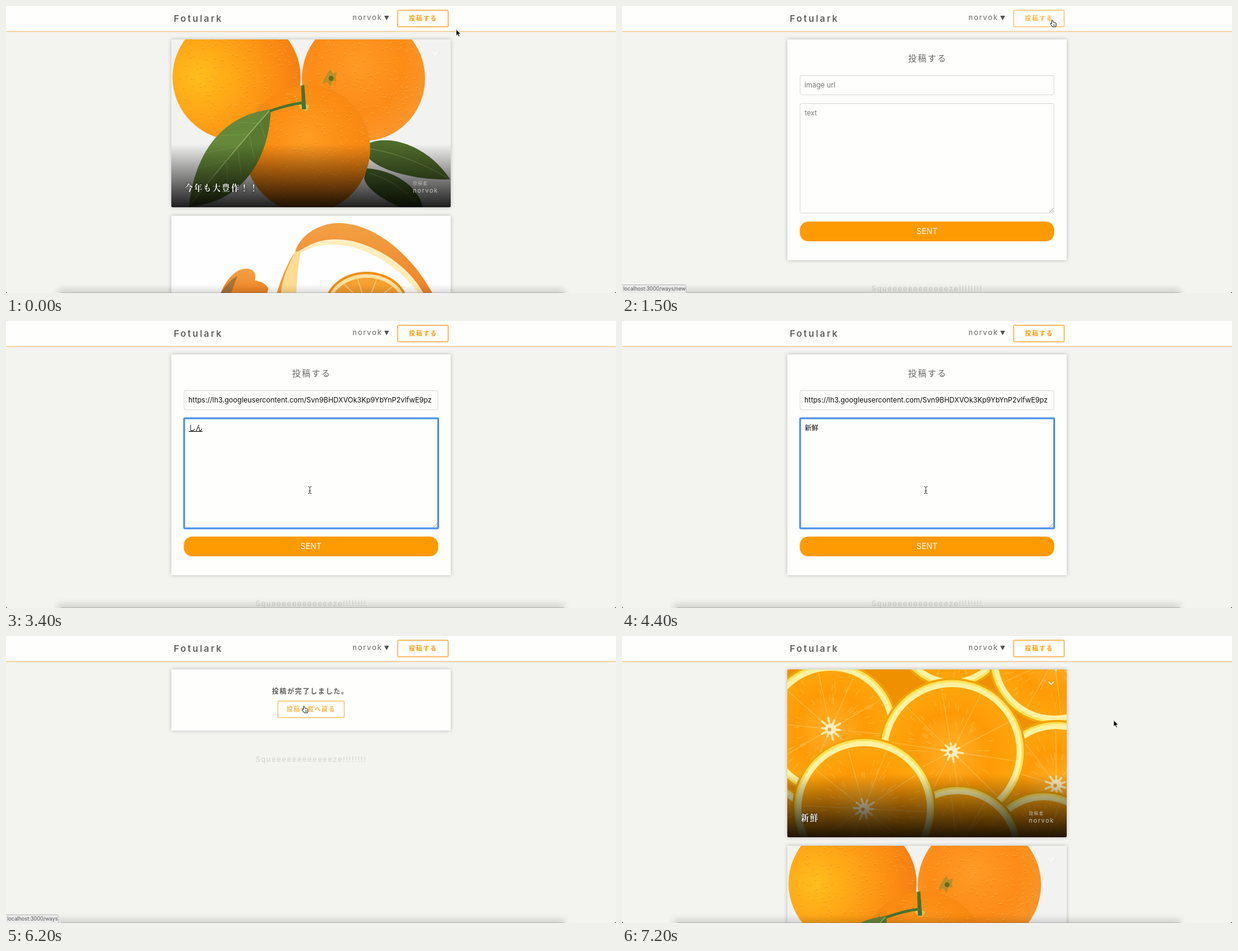
An HTML page that plays this animation: 1000 px wide and 472 px high, repeating every 7.3 s.

```html
<!DOCTYPE html>
<html lang="ja">
<head>
<meta charset="utf-8">
<title>Fotulark</title>
<style>
  html, body { margin: 0; width: 100%; height: 100%; overflow: hidden; background: #f3f3ef; }
  svg { display: block; width: 100vw; height: 100vh; }
  text { font-family: Inter, "Noto Sans CJK JP", sans-serif; white-space: pre; }
  .serif { font-family: "Noto Serif CJK JP", "Noto Serif", "Noto Sans CJK JP", serif; font-weight: 700; }
  .card { filter: drop-shadow(0 0 3px rgba(0,0,0,.24)); }
  .field { fill: #fefefd; stroke: #d9d9d9; }
  .focus { fill: none; stroke: #4a90e8; stroke-width: 3; }
  .btn rect { fill: #fff; stroke: #f9ab3c; stroke-width: 1.5; }
  .btn text { fill: #fb9a05; font-weight: 700; font-size: 10px; }
  .hover { opacity: .72; }
  .foot { fill: #d3d3d0; font-size: 12px; letter-spacing: 1.4px; }
</style>
</head>
<body>
<svg id="stage" viewBox="0 0 1000 472" preserveAspectRatio="none"></svg>
<script>
const LOOP = 7300, STEP = 100;
const USER = 'norvok';
const URL_HEAD = 'https://lh3.googleusercontent.com/Svn9BHDXVOk3Kp9YbYnP2vlfwE9pz';
const URL_TAIL = 'Bu3lklGfqp4TyxJZm5zDo-jdcSFqSShz9QdaEV_Whm5s=w640-h400-e365';

let seed = 7;
const rand = () => (seed = seed * 16807 % 2147483647) / 2147483647;

const text = (x, y, size, fill, str, extra = '') =>
  `<text x="${x}" y="${y}" font-size="${size}" fill="${fill}" ${extra}>${str}</text>`;
const path = (d, fill, extra = '') => `<path d="${d}" fill="${fill}" ${extra}/>`;
const line = (d, color, width, extra = '') =>
  path(d, 'none', `stroke="${color}" stroke-width="${width}" stroke-linecap="round" ${extra}`);
const disc = (x, y, r, fill) => `<circle cx="${x}" cy="${y}" r="${r}" fill="${fill}"/>`;
const ramp = (id, at, stops) => `<radialGradient id="${id}" ${at}>` +
  stops.map(([o, c]) => `<stop offset="${o}" stop-color="${c}"/>`).join('') + '</radialGradient>';

// an orange with small random dimples in its skin
function ball(x, y, rx, ry, skin) {
  let light = '', dark = '';
  for (let i = 0; i < 260; i++) {
    const a = rand() * 2 * Math.PI, d = Math.sqrt(rand()) * .95;
    const px = (x + Math.cos(a) * d * rx).toFixed(1), py = (y + Math.sin(a) * d * ry).toFixed(1);
    light += `M${px} ${py}l2-1`;
    dark += `M${px} ${py}m0 2l2-1`;
  }
  return `<ellipse cx="${x}" cy="${y}" rx="${rx}" ry="${ry}" fill="url(#${skin})"/>` +
    line(light, '#ffc765', 1.3, 'opacity=".3"') + line(dark, '#d96400', 1.3, 'opacity=".22"');
}

function slice(x, y, r, turn = 0) {
  let spokes = '', core = '', pulp = '';
  const ray = (a, from, to) => {
    const c = Math.cos(a), s = Math.sin(a);
    return `M${(x + c * from).toFixed(1)} ${(y + s * from).toFixed(1)}L${(x + c * to).toFixed(1)} ${(y + s * to).toFixed(1)}`;
  };
  for (let i = 0; i < 10; i++) {
    const a = turn + i * Math.PI / 5;
    spokes += ray(a, 14, r - 17);
    core += ray(a, 0, 13 + rand() * 6);
  }
  for (let i = 0; i < 70; i++) {
    const d = r * (.3 + rand() * .45);
    pulp += ray(rand() * 2 * Math.PI, d, d + 9);
  }
  return disc(x, y, r, '#f2a408') + disc(x, y, r - 3.5, '#ffe35a') + disc(x, y, r - 7, '#fff2a2') +
    disc(x, y, r - 15, 'url(#flesh)') + line(pulp, '#ffc44e', 1.4, 'opacity=".5"') +
    line(spokes, '#ffd06a', 1.2, 'opacity=".55"') + line(core, '#ffe9a8', 3.5) +
    disc(x, y, 9, '#fff0c0') + disc(x - 2, y + 1, 3, '#e9a23c');
}

const oranges = `<rect width="458" height="276" fill="#f2f2f1"/>` +
  ball(107, 62, 105, 104, 'skinLeft') + ball(315, 64, 101, 103, 'skinRight') +
  path('M250 66l6-11 5-6 3 7 8-2-3 8 2 6-7 1-3 9-5-8-8 3z', '#b8902a') + disc(262, 64, 4, '#6b6a1c') +
  path('M325 170C365 155 425 180 457 230 420 232 350 222 323 195z', '#4f6b2b') +
  path('M320 212C366 215 405 242 412 276H375C345 262 320 246 316 228z', '#4a6628') +
  line('M327 180Q390 190 457 230M325 220Q375 235 403 272', '#7f9a50', 1) +
  ball(223, 180, 103, 105, 'skinFront') +
  path('M209 108q6-6 17 1l-4 8q-9 1-13-9z', '#d9c25c') +
  path('M213 76l5-1 3 40h-7z', '#4a7030') +
  line('M217 104Q195 106 161 118', '#4a7330', 4.5) +
  path('M163 115C88 124 39 180 29 275 110 270 160 203 163 115z', '#65883a') +
  path('M161 117Q105 180 30 274C110 270 160 203 163 115z', '#58792f') +
  line('M160 118Q105 180 31 272', '#9ab56c', 1.4) +
  line('M143 138l-36-2M127 156l-47 2M110 176l-53 10M92 198l-47 14M73 220l-36 20M146 136l7 25M128 158l8 38M109 180l6 43M90 202l3 40M70 226l-1 31',
    '#87a558', .8, 'opacity=".6"');

const peel = `<rect width="458" height="276" fill="#fefefe"/>` +
  path('M203 59C212 29 247 11 276 12 330 13 390 58 428 127H413C394 92 352 56 298 42 262 35 231 40 211 60z', 'url(#rind)') +
  path('M205 61C235 39 266 37 300 43 353 57 392 90 413 127H405C382 95 342 64 296 51 262 43 231 48 211 62z', '#ffeebc') +
  path('M203 59L212 58Q206 94 205 127H174Q185 88 203 59z', '#ffdc92') +
  path('M196 74Q181 104 180 127h-7Q184 88 203 59z', '#f29a35') +
  path('M81 127C90 104 107 86 124 87 139 88 139 99 137 106 145 108 155 110 159 120L157 127z', 'url(#rind)') +
  path('M81 127Q94 107 108 99L98 127z', '#a8723a') +
  `<ellipse cx="320" cy="149" rx="69" ry="57" fill="#f28f12"/><ellipse cx="320" cy="149" rx="65" ry="53" fill="#ffe2a0"/>` +
  `<ellipse cx="320" cy="150" rx="60" ry="48" fill="#f9a030"/>` +
  line('M320 149L283 112M320 149L305 103M320 149L337 103M320 149L363 116', '#ffd28a', 1.5);

const slices = `<rect width="458" height="276" fill="#ef9000"/>` +
  slice(270, -65, 96) + slice(438, -17, 108, .2) + slice(71, 98, 111, .1) + slice(441, 190, 107, .3) +
  slice(270, 135, 121, .15) + slice(420, 300, 100) + slice(279, 297, 107, .2) +
  slice(-30, 257, 70) + slice(126, 229, 118, .05);

function post(y, photo, title) {
  return `<g transform="translate(271 ${y})"><rect class="card" width="458" height="276" rx="2" fill="#fff"/>
    <g clip-path="url(#frame)"><use href="#${photo}"/><rect y="172" width="458" height="104" fill="url(#shade)"/></g>` +
    line('M428.5 20.5l4 4 4-4', '#fff', 1.3) +
    text(22, 249, 13.2, '#fff', title, 'class="serif" letter-spacing="2" style="text-shadow:0 0 3px #000"') +
    text(396, 239, 7, '#bbb', '投稿者', 'letter-spacing="1.3"') +
    text(396, 252, 10, '#c4c4c4', USER, 'letter-spacing="1.5"') + '</g>';
}

const button = (id, x, y, w, label, gap, tx, ty) =>
  `<g id="${id}" class="btn"><rect x="${x}" y="${y}" width="${w}" height="27.3" rx="2"/>
   <text x="${tx}" y="${ty}" letter-spacing="${gap}">${label}</text></g>`;
const panel = h => `<rect class="card" x="271" y="55" width="458" height="${h}" fill="#fefefd"/>`;
const footer = y => `<text class="foot" x="409" y="${y}">Squ${'e'.repeat(12)}ze!!!!!!!!</text>`;

stage.innerHTML = `<defs>
  ${ramp('skinLeft', 'cx=".2" cy=".5" r=".85"', [[0, '#ffbd1c'], [.35, '#ffa616'], [.75, '#fb8a12'], [1, '#f47c14']])}
  ${ramp('skinRight', 'cx=".45" cy=".4" r=".62"', [[0, '#ff9a26'], [.6, '#fd8c16'], [1, '#f9962c']])}
  ${ramp('skinFront', 'cx=".5" cy=".4" r=".65"', [[0, '#ff9c22'], [.55, '#fb8b12'], [1, '#f08412']])}
  ${ramp('flesh', '', [[0, '#ffb02a'], [.6, '#ff9a06'], [1, '#ffa50c']])}
  <linearGradient id="rind" x2="0" y2="1"><stop offset="0" stop-color="#f3a045"/><stop offset="1" stop-color="#ef8426"/></linearGradient>
  <linearGradient id="shade" x2="0" y2="1"><stop offset="0" stop-opacity="0"/><stop offset="1" stop-opacity=".88"/></linearGradient>
  <clipPath id="frame"><rect width="458" height="276" rx="2"/></clipPath>
  <clipPath id="inner"><rect x="298" y="116" width="404" height="28"/></clipPath>
  <filter id="blur" x="-10%" y="-200%" width="120%" height="500%"><feGaussianBlur stdDeviation="6"/></filter>
  <g id="oranges">${oranges}</g><g id="peel">${peel}</g><g id="slices">${slices}</g>
</defs>
<rect width="1000" height="472" fill="#f3f3ef"/>
<rect width="1000" height="41.5" fill="#fefefd"/><rect y="41.3" width="1000" height="1.2" fill="#f9be76"/>
${text(275, 26, 15, '#626262', 'Fotulark', 'font-weight="600" letter-spacing="2.7"')}
${text(568, 22.5, 12, '#666', USER, 'letter-spacing="1.6"')}
${path('M620 16h8l-4 7.5z', '#555')}
${button('newBtn', 642.2, 7, 82.6, '投稿する', 1.7, 660.5, 24)}
<g id="before">${post(55, 'oranges', '今年も大豊作！！')}${post(345, 'peel', '')}</g>
<g id="form">${panel(363)}
  ${text(469, 91, 14, '#666', '投稿する', 'letter-spacing="2"')}
  <rect class="field" x="292" y="114.5" width="416" height="31.5" rx="2"/>
  <rect class="field" x="292" y="160.5" width="416" height="180" rx="2"/>
  ${line('M701 339l6-6M704.5 339l2.5-2.5', '#888', .9)}
  <rect id="ringUrl" class="focus" x="292" y="114" width="416.5" height="32" rx="1.5"/>
  <rect id="ringText" class="focus" x="292" y="160" width="416.5" height="181" rx="1.5"/>
  <g clip-path="url(#inner)">${text(299, 134.3, 11.6, '#111', '', 'id="url"')}</g>
  <rect id="caret" x="700.6" y="123" width="1" height="14" fill="#111"/>
  ${text(299.5, 180, 11.3, '#111', '', 'id="note"')}
  <rect x="291.5" y="354.5" width="417" height="32.5" rx="14" fill="#ff9b02"/>
  ${text(500, 375.3, 13, '#fff', 'SENT', 'text-anchor="middle"')}${footer(469)}</g>
<g id="done">${panel(100.5)}
  ${text(436, 94.7, 11, '#5c5c5c', '投稿が完了しました。', 'font-weight="700" letter-spacing="1.6"')}
  ${button('backBtn', 445.7, 107, 108.8, '投稿一覧へ戻る', 1.5, 460, 124.2)}${footer(206.5)}</g>
<g id="after">${post(55, 'slices', '新鮮')}${post(345, 'oranges', '')}</g>
<rect x="85" y="466" width="830" height="16" opacity=".15" filter="url(#blur)"/>
<rect x="90" y="471" width="825" height="1" fill="#777" opacity=".35"/>
${path('M0 469v3h3q-3 0-3-3M1000 469v3h-3q3 0 3-3', '#111')}
<g id="status"><path id="statusBox" fill="#e9e9e9" stroke="#bdbdbd"/>${text(2, 468, 8.4, '#555', '', 'id="statusText"')}</g>
<g id="pointer">
  <g id="arrow">${path('M0 0v10.5l2.4-2.2 1.7 3.7 1.8-.8-1.7-3.6h3.3z', '#000', 'stroke="#fff" stroke-width=".8"')}</g>
  <g id="hand">${path('M-2.5-5.5q1.6-1 2 .7l.6 3q3.5-.4 4.8 1.4.6 3-.7 5.6H-1.2L-4.5.8q-.6-1.7 1-1.3l1 .6z', '#fff', 'stroke="#222" stroke-width="1"')}${line('M.8 1.2v2.4M2.7 1.2v2.4', '#222', .7)}</g>
  <g id="beam">${line('M-2.5-5.5Q0-5.5 0-4.5 0-5.5 2.5-5.5M0-4.5v9M-2.5 5.5Q0 5.5 0 4.5 0 5.5 2.5 5.5M-1.2 1.5h2.4', '#333', 1)}</g>
</g>`;

const $ = id => document.getElementById(id);
const show = (id, on) => $(id).setAttribute('visibility', on ? 'inherit' : 'hidden');

// [time, value]: the last entry reached is the current one
const pages = [[0, 'before'], [1200, 'form'], [5200, 'done'], [6300, 'after']];
const shapes = [[0, 'arrow'], [500, 'hand'], [1800, 'arrow'], [2100, 'beam'], [4900, 'hand'], [5400, 'arrow'], [6000, 'hand'], [6400, 'arrow']];
const links = [[0, ''], [600, 'localhost:3000/ways/new'], [1800, ''], [6200, 'localhost:3000/ways'], [6800, '']];
const urls = [[0, ''], [2400, URL_TAIL], [2800, URL_HEAD]];
const notes = [[0, 'text'], [3000, 's'], [3100, 'し'], [3300, 'しn'], [3400, 'しん'], [3500, 'しんs'], [3600, 'しんせ'], [3700, 'しんせn'], [3800, 'しんせん'], [4000, '新鮮']];
// [time, x, y]
const moves = [[0, 738, 38.5], [200, 736, 37], [600, 707, 29], [1700, 707, 29], [2200, 495, 131], [2400, 495, 131], [2500, 495, 186],
  [2700, 498, 278], [4400, 498, 278], [4900, 485, 364], [5400, 485, 364], [6000, 490, 121], [6600, 490, 121],
  [6900, 640, 130], [7100, 806, 138.5]];

const at = (table, t) => table.filter(k => k[0] <= t).pop()[1];

function position(t) {
  const i = moves.findIndex(k => k[0] > t);
  if (i < 0) return moves[moves.length - 1].slice(1);
  const [t0, x0, y0] = moves[i - 1], [t1, x1, y1] = moves[i];
  const p = (t - t0) / (t1 - t0), e = p * p * (3 - 2 * p);
  return [x0 + (x1 - x0) * e, y0 + (y1 - y0) * e];
}

function draw(t) {
  const page = at(pages, t), shape = at(shapes, t), link = at(links, t), url = at(urls, t), note = at(notes, t);
  for (const [, id] of pages) show(id, id === page);
  for (const id of ['arrow', 'hand', 'beam']) show(id, id === shape);
  $('pointer').setAttribute('transform', `translate(${position(t)})`);

  show('status', link);
  const w = link.length > 20 ? 105 : 86;
  $('statusBox').setAttribute('d', `M-1 458.5H${w - 3}q3 0 3 3V473H-1z`);
  $('statusText').textContent = link;

  $('newBtn').classList.toggle('hover', t >= 500 && t < 1800);
  $('backBtn').classList.toggle('hover', t >= 6000 && t < 6300);

  const form = page === 'form', tail = url === URL_TAIL;
  show('ringUrl', form && t >= 2300 && t < 2800);
  show('ringText', form && t >= 2800 && t < 4900);
  show('caret', form && tail);
  $('url').textContent = url || 'image url';
  $('url').setAttribute('fill', url ? '#111' : '#777');
  $('url').setAttribute('x', tail ? 701 : 299);
  $('url').setAttribute('text-anchor', tail ? 'end' : 'start');
  $('note').textContent = note;
  $('note').setAttribute('fill', note === 'text' ? '#777' : '#111');
  $('note').setAttribute('text-decoration', t >= 3000 && t < 4200 ? 'underline' : 'none');
}

let drawn = -1;
function tick() {
  const t = Math.floor(performance.now() % LOOP / STEP) * STEP;
  if (t !== drawn) draw(drawn = t);
  requestAnimationFrame(tick);
}
tick();
</script>
</body>
</html>
```
